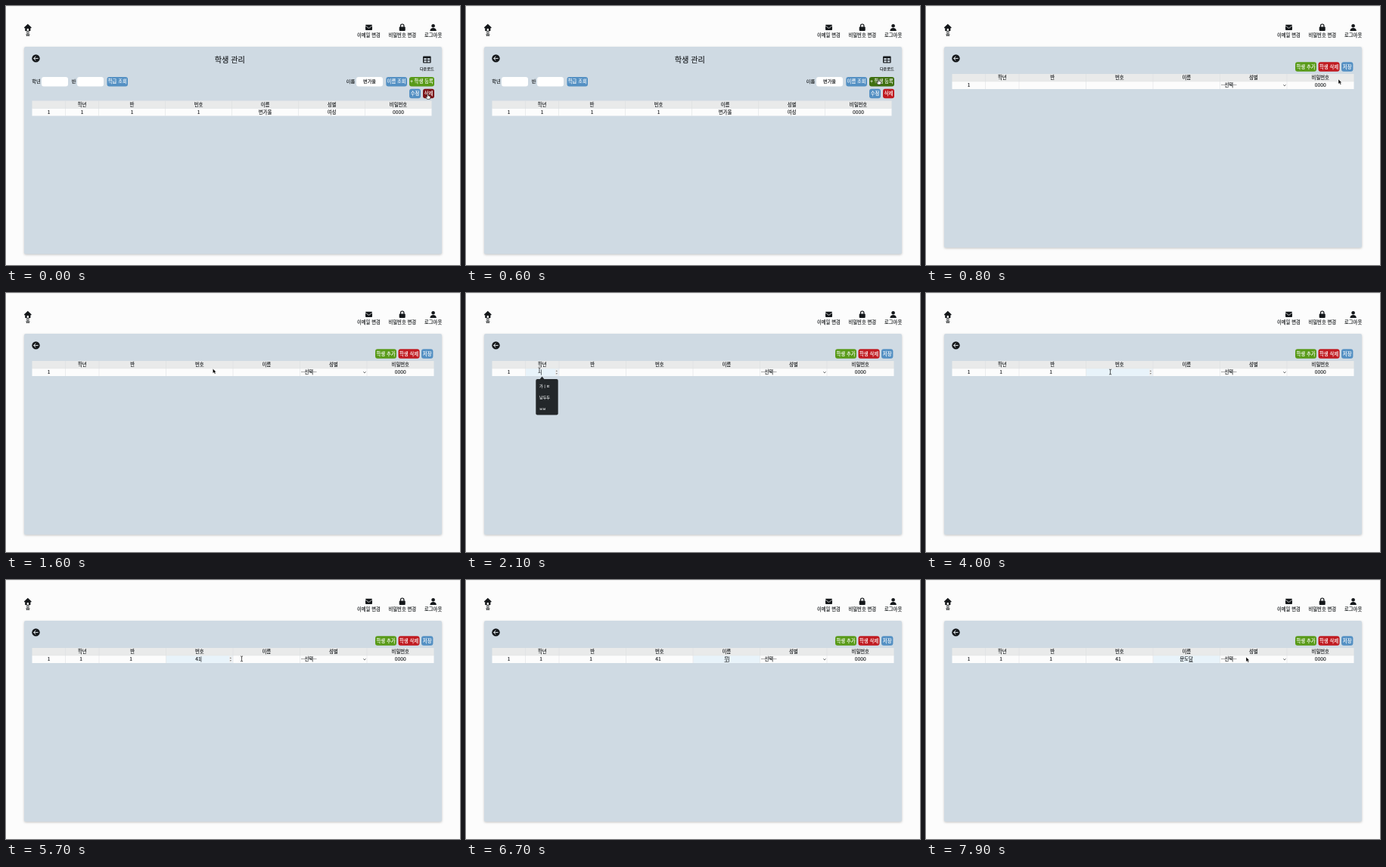
An HTML page for the animation above (8000 ms loop, 600 by 343 pixels).

```html
<!DOCTYPE html>
<html lang="ko">
<head>
<meta charset="utf-8">
<title>학생 관리</title>
<style>
  html, body { margin: 0; width: 100%; height: 100%; overflow: hidden; background: #fcfcfc; }
  svg { display: block; width: 100%; height: 100%; }
  text { font-family: "Noto Sans CJK KR", "Noto Sans CJK", "Noto Sans", sans-serif; font-weight: 500; stroke-width: .12px; white-space: pre; }
  .panel { fill: #cfdae3; filter: drop-shadow(0 1px 1.5px rgba(0, 0, 0, .22)); }
</style>
</head>
<body>
<svg id="stage" viewBox="0 0 600 343"></svg>
<script>
const LOOP = 8000, TICK = 100;
const INK = '#15181b', BLUE = '#5490c3', GREEN = '#589a18', RED = '#c01a20';
const OLD_NAME = '변가울';

const rect = (x, y, w, h, fill, r = 0, extra = '') =>
  `<rect x="${x}" y="${y}" width="${w}" height="${h}" rx="${r}" fill="${fill}" ${extra}/>`;
const path = (d, extra = '') => `<path d="${d}" ${extra}/>`;
const group = (id, body) => `<g id="${id}">${body}</g>`;
// y is the middle of the glyphs
const text = (x, y, size, str, fill = INK, anchor = 'middle', id = '') =>
  `<text ${id && `id="${id}"`} x="${x}" y="${y + size * .36}" font-size="${size}" fill="${fill}" stroke="${fill}" text-anchor="${anchor}">${str}</text>`;
const button = (x, y, w, h, label, fill, id = '') =>
  rect(x, y, w, h, fill, 3, id && `id="${id}"`) + text(x + w / 2, y + h / 2, 6.35, label, '#fff');

const edges = (left, unit) => [0, 1, 2, 4, 6, 8, 10, 12].map(n => left + n * unit);
const HEADERS = ['', '학년', '반', '번호', '이름', '성별', '비밀번호'];

function table(cols, y, row, cellExtras = '') {
  const left = cols[0], width = cols[7] - left;
  const mid = i => (cols[i] + cols[i + 1]) / 2;
  return rect(left, y, width, 10, '#e9eaea') + rect(left, y + 10, width, 10, '#fcfcfc') + cellExtras +
    cols.slice(1, 7).map(x => rect(x - .25, y, .5, 20, '#d9dcde')).join('') +
    rect(left, y + 9.8, width, .4, '#dcdfe1') +
    HEADERS.map((h, i) => text(mid(i), y + 5, 6.35, h)).join('') +
    row.map((v, i) => text(mid(i), y + 14.8, /^\d/.test(v) ? 6.7 : 6.35, v)).join('');
}

const topBar = rect(0, 0, 600, .8, '#f1f1f1') +
  path('M23.8 28.6 28.8 23.8 33.8 28.6 33 29.4 32.4 28.9V33H29.9V29.9H27.7V33H25.2V28.9L24.6 29.4Z', `fill="${INK}"`) +
  text(28.8, 37, 6.3, '홈') +
  rect(475, 24.8, 9, 7.2, INK, 1) + path('M475 26.2 479.5 29.4 484 26.2', 'fill="none" stroke="#fcfcfc" stroke-width=".7"') +
  text(479.4, 38.6, 6.3, '이메일 변경') +
  rect(519.7, 27.6, 8, 5.4, INK, 1) + path('M521.5 28V26.2a2.2 2.2 0 0 1 4.4 0V28', `fill="none" stroke="${INK}" stroke-width="1.2"`) +
  text(523.8, 38.6, 6.3, '비밀번호 변경') +
  `<circle cx="564.6" cy="26.2" r="2.3" fill="${INK}"/>` +
  path('M560.4 33c0-5.2 8.4-5.2 8.4 0Z', `fill="${INK}"`) +
  text(564.6, 38.6, 6.3, '로그아웃');

const back = `<circle cx="39.5" cy="69.4" r="5.2" fill="${INK}"/>` +
  path('M42.6 69.4H36.8M39.3 66.7 36.6 69.4 39.3 72.1', 'fill="none" stroke="#e8eef2" stroke-width="1"');

const field = x => rect(x, 94, 35, 12.4, '#fff', 3);
const listPage = rect(24, 54, 552, 274.5, '', 2, 'class="panel"') + back +
  text(295.8, 71, 10.2, '학생 관리') +
  rect(551, 66.4, 10.6, 9.2, INK, 1) +
  [[552.3, 69.2], [556.8, 69.2], [552.3, 72.3], [556.8, 72.3]].map(([x, y]) => rect(x, y, 3.5, 2.1, '#cfdae3')).join('') +
  text(556.3, 83, 5.1, '다운로드') +
  text(40, 100, 6.2, '학년') + field(47) + text(89.5, 100, 6.2, '반') + field(94) +
  button(133.5, 94, 27.5, 12.4, '학급 조회', BLUE) +
  text(455.5, 100, 6.2, '이름') + field(463) + text(480.5, 100, 6.2, OLD_NAME) +
  button(502.3, 94, 27.7, 12.4, '이름 조회', BLUE) +
  button(533, 94, 33, 12.4, '+ 학생 등록', GREEN, 'register') +
  button(533, 109.7, 15, 12.6, '수정', BLUE) +
  button(551, 109.7, 15, 12.6, '삭제', RED, 'remove') +
  table(edges(34.5, 44), 125.5, ['1', '1', '1', '1', OLD_NAME, '여성', '0000']);

const COLS = edges(34.5, 44.25);
const FIELDS = [
  { left: COLS[1], right: COLS[2], mid: 99, spin: true },
  { left: COLS[2], right: COLS[3], mid: 165.2, spin: true },
  { left: COLS[3], right: COLS[4], mid: 253.9, spin: true },
  { left: COLS[4], right: COLS[5], mid: 344.2, spin: false }
];
const formPage = rect(24, 54, 552, 266, '', 2, 'class="panel"') + back +
  button(488, 74.3, 28, 12.4, '학생 추가', GREEN) +
  button(518.5, 74.3, 28, 12.4, '학생 삭제', RED) +
  button(549, 74.3, 15.4, 12.4, '저장', BLUE) +
  table(COLS, 90, ['1', '', '', '', '', '', '0000'], rect(0, 100.2, 0, 9.6, '#e8f3fa', 0, 'id="focus"')) +
  text(390, 104.8, 6.35, '--선택--', INK, 'start') +
  path('M472.3 104.3 473.9 105.8 475.5 104.3', `fill="none" stroke="${INK}" stroke-width=".7"`) +
  FIELDS.map((f, i) => text(f.mid, 104.8, i < 3 ? 6.7 : 6.35, '', INK, 'middle', 'value' + i)).join('') +
  group('spinner', rect(-1.8, 100.8, 3.6, 8.4, '#eeeeee') +
    path('M-1.1 103.8 0 102.4 1.1 103.8ZM-1.1 106.2 0 107.6 1.1 106.2Z', 'fill="#555"')) +
  rect(0, 101.3, .6, 7.4, INK, 0, 'id="caret"') +
  rect(0, 108.3, 5.4, .6, INK, 0, 'id="underline"') +
  group('suggest', path('M97.3 114.6 100.5 110.6 103.7 114.6Z', 'fill="#23272a"') +
    rect(92.3, 114, 29.4, 47.5, '#23272a', 2) +
    ['가ㅣㄸ', '남두두', 'ㅂㅂ'].map((s, i) => text(97, 123 + i * 15, i < 2 ? 5.1 : 4.6, s, '#e4e6e8', 'start')).join(''));

const pointers =
  group('arrow', path('M0 0V6.2L1.5 4.9 2.6 7.2 3.7 6.7 2.7 4.5H4.5Z', 'fill="#000" stroke="#fff" stroke-width=".4"')) +
  group('beam', path('M-1.5-3.4Q0-3.4 0-2.6Q0-3.4 1.5-3.4M0-2.6V2.6M-1.5 3.4Q0 3.4 0 2.6Q0 3.4 1.5 3.4', 'fill="none" stroke="#111" stroke-width=".7"')) +
  group('hand', path('M-.7.5Q0-.5.7.5V2.5L3.2 3.2Q4 3.5 3.7 4.7L3 7H-.7L-2.3 4.5Q-2.4 3.5-1.6 3.7L-.7 4.5Z', 'fill="#fff" stroke="#111" stroke-width=".6"'));

document.getElementById('stage').innerHTML =
  topBar + group('list', listPage) + group('form', formPage) + pointers;
const el = id => document.getElementById(id);
const show = (id, on) => el(id).setAttribute('display', on ? 'inline' : 'none');
const move = (id, x) => el(id).setAttribute('x', x);

// time, x, y, pointer
const TRACK = [
  [0, 557.2, 116.3, 'hand'], [600, 545, 97, 'hand'], [800, 545, 97, 'arrow'], [1200, 545, 97, 'arrow'],
  [1900, 97, 102.2, 'beam'], [2300, 97, 102.2, ''], [2500, 97, 102.2, 'beam'], [2800, 182.5, 103, 'beam'],
  [3000, 182.5, 103, ''], [3100, 182.5, 103, 'beam'], [3500, 243.6, 104.5, 'beam'], [4200, 243.6, 104.5, ''],
  [4900, 243.6, 104.5, 'beam'], [5300, 303, 104.5, 'beam'], [5400, 303, 104.5, 'beam'], [5700, 311.5, 104.3, 'beam'],
  [5900, 335.8, 104.8, 'beam'], [6400, 335.8, 104.8, ''], [7700, 352, 104.5, ''], [7800, 385, 103.5, 'beam'],
  [7900, 423, 102, 'arrow'], [LOOP, 423, 102, 'arrow']
];
// time, focused field, its content
const TYPING = [
  [2000, 0, ''], [2300, 0, '1'], [2900, 1, ''], [3000, 1, '1'],
  [4000, 2, ''], [4200, 2, '4'], [4300, 2, '41'], [5900, 3, ''],
  ...['ㅁ', '무', '문', '문ㄷ', '문도', '문돋', '문도다', '문도담']
    .map((s, i) => [[6400, 6700, 6800, 7000, 7100, 7200, 7300, 7400][i], 3, s])
];

function drawPointer(t) {
  const i = TRACK.findLastIndex(k => k[0] <= t);
  const a = TRACK[i], b = TRACK[i + 1];
  const p = (t - a[0]) / (b[0] - a[0]), e = p * p * (3 - 2 * p);
  const x = a[1] + (b[1] - a[1]) * e, y = a[2] + (b[2] - a[2]) * e;
  for (const id of ['arrow', 'beam', 'hand']) {
    show(id, a[3] === id);
    el(id).setAttribute('transform', `translate(${x} ${y})`);
  }
  const over = (left, top, right, bottom) => x > left && x < right && y > top && y < bottom;
  el('remove').setAttribute('fill', over(551, 109, 566, 123) ? '#7c1418' : RED);
  el('register').setAttribute('fill', over(533, 94, 566, 107) ? '#3f7010' : GREEN);
}

function drawFields(t) {
  const done = TYPING.filter(k => k[0] <= t), last = done.at(-1);
  FIELDS.forEach((f, i) => {
    const entry = done.findLast(k => k[1] === i);
    el('value' + i).textContent = entry ? entry[2] : '';
  });
  const f = last && FIELDS[last[1]];
  show('focus', f);
  show('spinner', f && f.spin);
  show('suggest', t >= 2100 && t < 2300);
  show('underline', f && !f.spin && last[2]);
  if (!f) return show('caret', false);

  move('focus', f.left + .3);
  el('focus').setAttribute('width', f.right - f.left - .6);
  el('spinner').setAttribute('transform', `translate(${f.right - 3.2} 0)`);
  const end = f.mid + (last[2] ? el('value' + last[1]).getComputedTextLength() / 2 : 0);
  move('caret', end);
  move('underline', end - 5.6);
  const since = t - last[0] - (last[2] ? 0 : 100);
  show('caret', Math.floor(since / 500) % 2 === 0);
}

function frame(now) {
  const t = Math.floor((now - start) % LOOP / TICK) * TICK;
  show('list', t < 800);
  show('form', t >= 800);
  drawPointer(t);
  drawFields(t);
  requestAnimationFrame(frame);
}
const start = performance.now();
frame(start);
</script>
</body>
</html>
```
